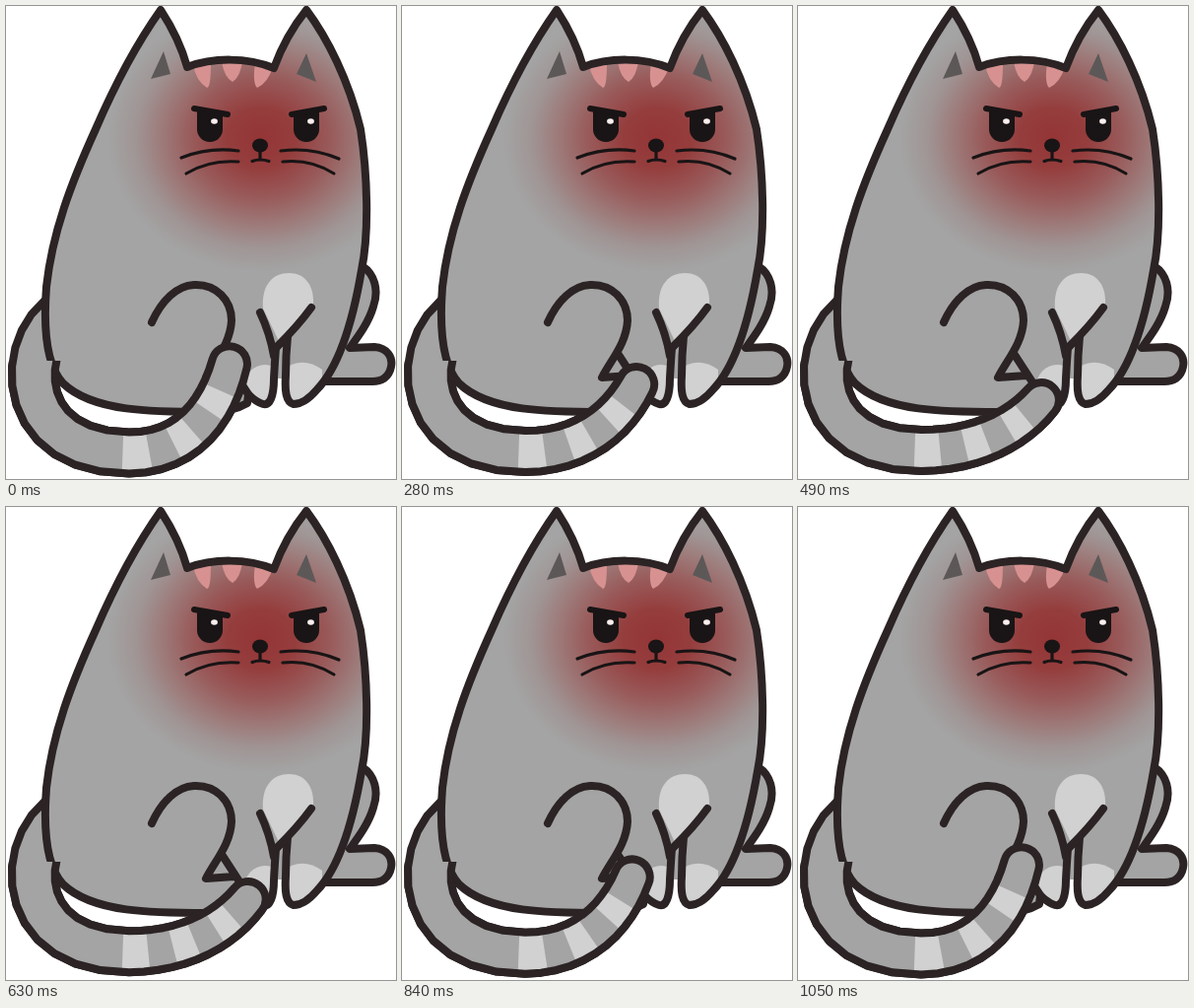
Recreate the animation shown at these times as an HTML page. Size 396 by 480 pixels, loop 1.61 s.

```html
<!DOCTYPE html>
<html lang="en">
<head>
<meta charset="utf-8">
<title>Grumpy cat</title>
<style>
  html, body { margin: 0; width: 100%; height: 100%; overflow: hidden; background: #fff; }
  svg { display: block; width: 100vw; height: 100vh; }
  .ink { fill: none; stroke: #2b2324; stroke-width: 8; stroke-linecap: round; stroke-linejoin: round; }
  .fur { fill: #a4a4a4; }
  .pale { fill: #d1d1d1; }
  .pink { fill: #d69190; }
  .dark { fill: #191415; }
  .ear { fill: #5d5858; }
  .brow { stroke: #191415; stroke-width: 6; }
  .thin { stroke: #191415; stroke-width: 3.2; }
</style>
</head>
<body>
<svg viewBox="0 0 396 480">
  <defs>
    <radialGradient id="anger" gradientUnits="userSpaceOnUse" cx="0" cy="0" r="1"
                    gradientTransform="translate(259 134) scale(156 136)">
      <stop offset="0" stop-color="#943536"/>
      <stop offset=".22" stop-color="#953d3d"/>
      <stop offset=".45" stop-color="#995a5a"/>
      <stop offset=".65" stop-color="#9d7b7a"/>
      <stop offset=".82" stop-color="#a09595"/>
      <stop offset="1" stop-color="#a4a4a4"/>
    </radialGradient>
    <path id="shape" d="M205 412C150 412 88 412 58 383C40 364 38 325 41 285
      C47 230 66 180 91 125C107 88 130 42 157 4Q176 33 184 62C210 52 245 52 272 63
      Q284 30 305 4C326 32 348 75 360 125C367 170 369 230 361 268
      C353 315 339 365 316 389C305 402 298 404 292 404C284 402 283 390 284 375
      Q284 355 286 335L274 347Q273 360 272 378C272 396 268 406 261 404
      C254 402 250 398 246 394L245 403Q230 412 205 412Z"/>
    <clipPath id="inside"><use href="#shape"/></clipPath>
    <clipPath id="front"><path d="M0 360H110V300H396V480H0Z"/></clipPath>
    <g id="tail">
      <path id="tailFur" class="fur"/>
      <path id="bands" class="pale"/>
      <path id="tailLine" class="ink"/>
    </g>
  </defs>

  <use href="#tail"/>

  <!-- far hind leg -->
  <path class="ink" style="fill:#a4a4a4" d="M362 264C374 272 379 288 373 305C368 322 357 336 349 347
    L374 346C387 347 393 356 391 366C389 377 381 381 372 381L318 381"/>

  <!-- body -->
  <path class="fur" d="M272 345H286V378H272Z"/>
  <use href="#shape" fill="url(#anger)"/>
  <g clip-path="url(#inside)">
    <g class="pale">
      <path d="M261 307C259 282 272 271 287 271C304 271 313 284 312 303L278 342Z"/>
      <ellipse cx="263" cy="386" rx="21" ry="22"/>
      <path d="M280 370Q300 354 321 369V410H280Z"/>
    </g>
    <path class="pink" d="M190 60Q193 76 204 83Q208 83 208 58ZM219 57Q222 73 230 77Q238 72 240 56Z
      M253 58Q250 78 255 83Q266 78 271 62Z"/>
  </g>
  <path class="ear" d="M160 46L147 74L167 69ZM305 48L295 69L315 77Z"/>
  <use href="#shape" class="ink"/>
  <path class="ink" d="M310 306Q297 324 274 347M258 311Q268 332 272 355M220 354L246 394
    M148 321C158 299 173 284 191 283C214 282 229 299 229 319C228 342 213 358 203 377L232 375"/>

  <!-- face -->
  <path class="dark" d="M194 107L220 111V125A13 13 0 0 1 194 125ZM292 111L318 107V125A13 13 0 0 1 292 125Z"/>
  <path class="ink brow" d="M191 104L225 110M290 110L323 104"/>
  <g fill="#fbeeee">
    <ellipse cx="211.500" cy="117" rx="3.400" ry="2.800"/>
    <ellipse cx="309.500" cy="117" rx="3.400" ry="2.800"/>
  </g>
  <ellipse class="dark" cx="258" cy="141.500" rx="8" ry="7"/>
  <path class="ink thin" d="M258 146V155M250 157.500Q258 154.500 267 157.500
    M178 154Q206 143 236 147M183 170Q206 156 236 158
    M279 147Q310 143 338 155M281 158Q309 155 333 170"/>

  <use href="#tail" clip-path="url(#front)"/>
</svg>
<script>
  const STEP = 70, LOOP = 1610, MOVES = 7, RETURN = 560, SAMPLES = 24;
  const BANDS = [[.98, 1.12], [1.29, 1.45], [1.635, 1.8]];

  const $ = id => document.getElementById(id);
  const lerp = (a, b, k) => a + (b - a) * k;
  const mix = (p, q, k) => [lerp(p[0], q[0], k), lerp(p[1], q[1], k)];

  // Point and unit direction on a cubic curve.
  function cubic([a, b, c, d], t) {
    const p = mix(mix(a, b, t), mix(b, c, t), t);
    const q = mix(mix(b, c, t), mix(c, d, t), t);
    const dx = q[0] - p[0], dy = q[1] - p[1], len = Math.hypot(dx, dy);
    return { at: mix(p, q, t), dir: [dx / len, dy / len] };
  }

  // The spine runs u = 0..1 from root to lowest point, 1..2 up to the tip.
  function tail(sink) {
    const low = [125, lerp(453.5, 451, sink)];
    const root = [[53, 316], [10, 352], [14, low[1]], low];
    const end = [low, [lerp(185, 180, sink), low[1]],
      mix([215, 410], [222, 430], sink), mix([227, 363], [247, 400], sink)];
    const radius = u => 22 - u * u;

    function edge(u, side) {
      const { at, dir } = u < 1 ? cubic(root, u) : cubic(end, u - 1);
      const r = radius(u) * side;
      return [at[0] - dir[1] * r, at[1] + dir[0] * r].map(v => v.toFixed(2));
    }
    function side(from, to, sign) {
      return Array.from({ length: SAMPLES + 1 },
        (_, i) => edge(lerp(from, to, i / SAMPLES), sign)).join('L');
    }
    const r = radius(2);
    return {
      outline: `M${side(0, 2, 1)}A${r} ${r} 0 0 0 ${edge(2, -1)}L${side(2, 0, -1)}`,
      bands: BANDS.map(([a, b]) => `M${side(a, b, 1)}L${side(b, a, -1)}Z`).join('')
    };
  }

  // Down in seven steps, a rest, then back up the same way.
  function pose(ms) {
    const down = Math.floor(ms / STEP);
    const up = Math.max(0, Math.floor((ms - RETURN) / STEP));
    const step = Math.max(0, Math.min(down, MOVES) - up);
    return (1 - Math.cos(Math.PI * (step / MOVES) ** 1.1)) / 2;
  }

  let shown = -1;
  function draw(now) {
    const sink = pose(now % LOOP);
    if (sink !== shown) {
      shown = sink;
      const { outline, bands } = tail(sink);
      $('tailFur').setAttribute('d', outline);
      $('tailLine').setAttribute('d', outline);
      $('bands').setAttribute('d', bands);
    }
    requestAnimationFrame(draw);
  }
  draw(performance.now());
</script>
</body>
</html>
```
